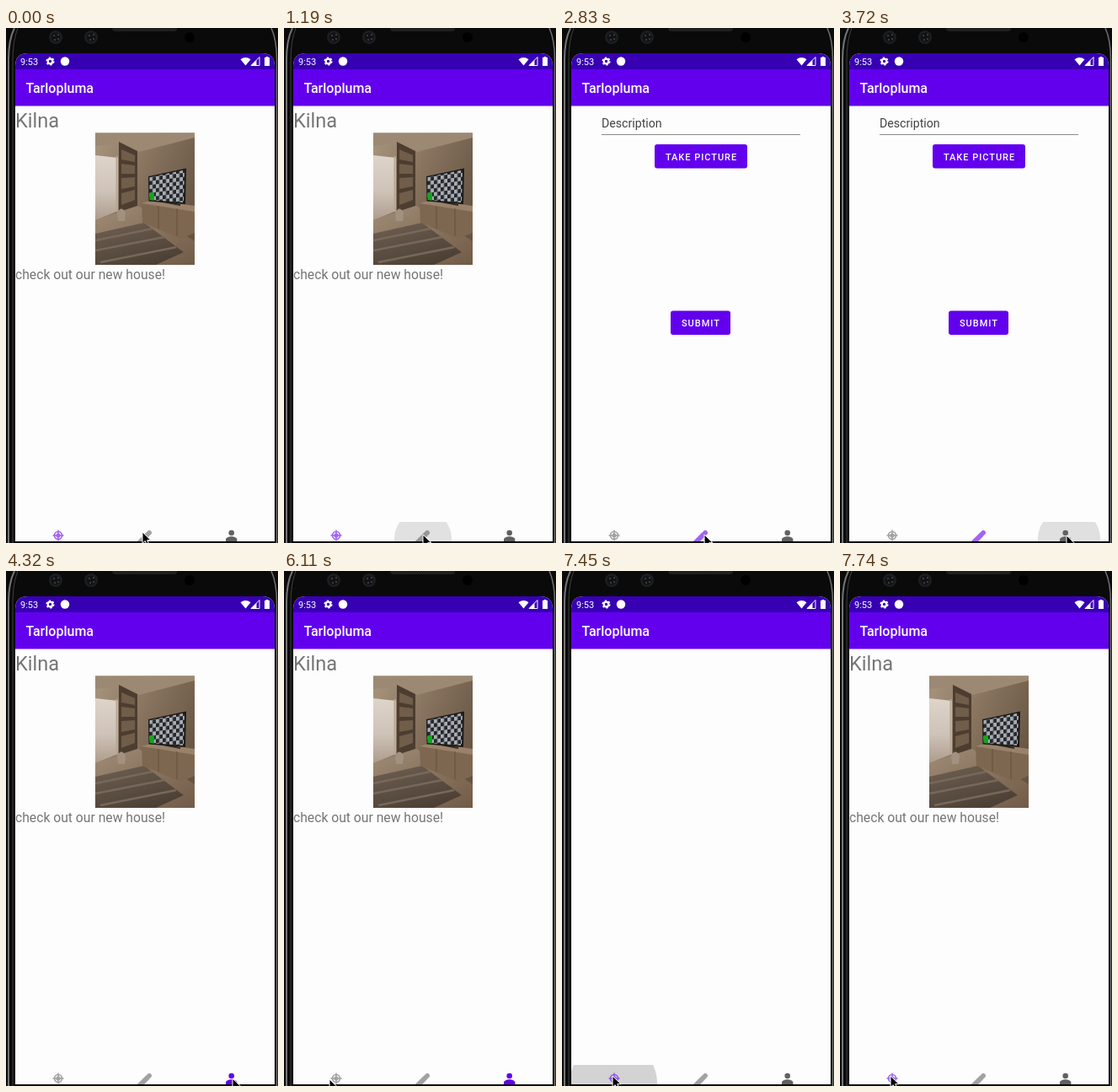
An HTML page that plays this animation: 323 px wide and 611 px high, repeating every 8 s.

```html
<!DOCTYPE html>
<html lang="en">
<head>
<meta charset="utf-8">
<title>Photo feed</title>
<style>
html, body { margin: 0; width: 100%; height: 100%; overflow: hidden; background: #0a0a0a; }
svg { display: block; width: 100%; height: 100%; font-family: Roboto, sans-serif; }

.medium { font-weight: 500; }
.button { font-size: 11px; font-weight: 500; letter-spacing: .98px; fill: #fff; }
.icon { color: #666; fill: currentColor; stroke: currentColor; }
.soft { opacity: .6; }

.post, .form, .icon, .ripple, .cursor { animation: 8s step-end infinite; }
.post { animation-name: post; }
.form { animation-name: form; }
.home { animation-name: home; }
.edit { animation-name: edit; }
.user { animation-name: user; stroke: none; }
.ripple { animation-name: ripple; }
.cursor { animation-name: cursor; }

@keyframes post {
  0%, 50.25%, 95% { visibility: visible; }
  16.75%, 93.125% { visibility: hidden; }
  100% { visibility: visible; }
}
@keyframes form {
  0%, 48.375%, 100% { visibility: hidden; }
  16.75% { visibility: visible; }
}
@keyframes home {
  0%, 93.125%, 100% { color: #6200ee; }
  16.75% { color: #666; }
}
@keyframes edit {
  0%, 48.375%, 100% { color: #666; }
  16.75% { color: #6200ee; }
}
@keyframes user {
  0%, 93.125%, 100% { color: #616161; }
  48.375% { color: #6200ee; }
}
@keyframes ripple {
  0%, 20.375%, 54%, 96.75%, 100% { transform: translate(165px, 608px) scale(30); opacity: 0; }
  14.875% { transform: translate(165px, 606px) scale(34); opacity: .11; }
  16.75% { transform: translate(165px, 608px) scale(56); opacity: .165; }
  18.625% { transform: translate(165px, 608px) scale(58); opacity: .07; }
  46.5% { transform: translate(272px, 606px) scale(37); opacity: .115; }
  48.375% { transform: translate(268px, 608px) scale(54); opacity: .165; }
  50.25% { transform: translate(268px, 608px) scale(57); opacity: .12; }
  52.125% { transform: translate(268px, 608px) scale(58); opacity: .05; }
  93.125% { transform: translate(61px, 608px) scale(52); opacity: .165; }
  95% { transform: translate(62px, 608px) scale(57); opacity: .07; }
}
@keyframes cursor {
  0%, 100% { transform: translate(162px, 598px); }
  7.5% { transform: translate(163px, 599px); }
  9.25% { transform: translate(164px, 600px); }
  11.125% { transform: translate(165px, 601px); }
  35.375% { transform: translate(169px, 601px); }
  37.25% { transform: translate(187px, 602px); }
  39.125% { transform: translate(220px, 603px); }
  41% { transform: translate(249px, 603px); }
  42.75% { transform: translate(264px, 602px); }
  44.625% { transform: translate(269px, 602px); }
  69% { transform: translate(232px, 599px); }
  70.875% { transform: translate(104px, 596px); }
  72.75% { transform: translate(41px, 598px); }
  76.375% { transform: translate(54px, 603px); }
  78.25% { transform: translate(60px, 601px); }
  80.125% { transform: translate(65px, 599px); }
  82% { transform: translate(66px, 598px); }
  87.5% { transform: translate(62px, 598px); }
  89.375% { transform: translate(60px, 599px); }
}
</style>
</head>
<body>
<svg viewBox="0 0 323 611" preserveAspectRatio="none">
  <defs>
    <clipPath id="screen"><path d="M11 609V45Q11 30 26 30H304Q319 30 319 45V609Z"/></clipPath>
    <clipPath id="nav"><path d="M11 586.500H319V609H11Z"/></clipPath>
    <clipPath id="photo"><path d="M106 124.500H224V281H106Z"/></clipPath>
    <pattern id="checks" width="8" height="9.400" patternUnits="userSpaceOnUse" patternTransform="translate(170 177) skewY(-7)">
      <path d="M0 0H8V9.400H0Z" fill="#25272b"/>
      <path d="M0 0H4V4.700H0ZM4 4.700H8V9.400H4Z" fill="#a9adb4"/>
    </pattern>
    <pattern id="mesh" width="3" height="3" patternUnits="userSpaceOnUse">
      <path d="M0 0H3V3H0Z" fill="#191919"/>
      <path d="M0 3L3 0" stroke="#333" stroke-width=".7"/>
    </pattern>
    <linearGradient id="wall" x2="1" y2=".6">
      <stop stop-color="#a9967f"/><stop offset=".5" stop-color="#86725d"/><stop offset="1" stop-color="#665443"/>
    </linearGradient>
    <linearGradient id="window" x2="0" y2="1">
      <stop stop-color="#ded4c9"/><stop offset=".55" stop-color="#cfc3b8"/><stop offset="1" stop-color="#ad9c8d"/>
    </linearGradient>
    <linearGradient id="floor" x2="1" y2="1">
      <stop stop-color="#a08c77"/><stop offset="1" stop-color="#715b47"/>
    </linearGradient>
    <linearGradient id="rug" x2=".6" y2="1">
      <stop stop-color="#6f6052"/><stop offset="1" stop-color="#4c4035"/>
    </linearGradient>
    <g id="lens">
      <circle r="8" fill="#1d1e20"/>
      <circle r="5.500" fill="#111214"/>
      <path d="M-3-2h2M2-3h2M-2 3h2M2 2h2" stroke="#45484c" stroke-width="1.500"/>
    </g>
  </defs>

  <!-- Phone body -->
  <path d="M0 0H323V611H0Z" fill="#0a0a0a"/>
  <g fill="none">
    <path d="M10 0Q3 14 3 38V611" stroke="#757575" stroke-width="2"/>
    <path d="M14 0Q8 15 8 38V611" stroke="#404040"/>
    <path d="M315 0Q321.500 14 321.500 38V611" stroke="#707070" stroke-width="1.500"/>
  </g>
  <path d="M126 0H203Q203 4 199 4H130Q126 4 126 0Z" fill="url(#mesh)"/>
  <use href="#lens" x="59" y="11"/>
  <use href="#lens" x="101" y="11"/>
  <circle cx="218" cy="11" r="6" fill="#000"/>

  <g clip-path="url(#screen)">
    <path d="M11 30H319V609H11Z" fill="#fdfdfd"/>
    <path d="M11 30H319V49H11Z" fill="#3700b3"/>
    <path d="M11 49H319V92.500H11Z" fill="#6200ee"/>

    <!-- Status bar -->
    <g fill="#fff">
      <text x="17" y="44" font-size="11">9:53</text>
      <g fill="none" stroke="#fff">
        <circle cx="52.500" cy="39.500" r="2.800" stroke-width="2.200"/>
        <circle cx="52.500" cy="39.500" r="4.300" stroke-width="1.600" stroke-dasharray="2.250 2.253"/>
      </g>
      <circle cx="70" cy="39.500" r="5.200"/>
      <path d="M278.500 37.200Q284.500 32.800 290.500 37.200L284.500 44.500Z"/>
      <path d="M301 34.500V44.500H291Z" fill="none" stroke="#fff" stroke-width="1"/>
      <path d="M297.500 38V44.500H291Z"/>
      <path d="M308.500 35V34H311.500V35H313V45H307V35Z"/>
    </g>
    <text class="medium" x="23.500" y="77" font-size="16" fill="#fff">Tarlopluma</text>

    <!-- Feed post -->
    <g class="post">
      <text x="11" y="118" font-size="23.600" fill="#757575">Kilna</text>
      <g clip-path="url(#photo)">
        <path d="M106 124H224V281H106Z" fill="url(#wall)"/>
        <path d="M106 124H224V130L158 147L134 137L106 140Z" fill="#9c8973"/>
        <path d="M106 151L133 154V217L106 228Z" fill="url(#window)"/>
        <path d="M131.500 152V218" stroke="#b5a695" stroke-width="2"/>
        <path d="M134 135L156 146V211L134 218Z" fill="#4c3d30"/>
        <path d="M137 144L153 151V159L137 156ZM137 161L153 163V173L137 173ZM137 178L153 177V188L137 191ZM137 196L153 192V204L137 210Z" fill="#705d4a"/>
        <path d="M106 228L157 211L224 253V281H106Z" fill="url(#floor)"/>
        <path d="M106 244L164 231L211 266L178 281H106Z" fill="url(#rug)"/>
        <path d="M106 252L174 238M106 264L188 248M112 278L202 260" stroke="#77685a" stroke-width="2.500"/>
        <path d="M161 208L224 217V243L207 250L162 231Z" fill="#7e6751"/>
        <path d="M161 208L174 204L224 211V218Z" fill="#9a826a"/>
        <path d="M181 211V238M203 214V247" stroke="#65513f"/>
        <path d="M132 219Q137 210 142 219L141 229H133Z" fill="#a39180"/>
        <path d="M181 205L207 210" stroke="#30291f" stroke-width="2"/>
        <path d="M169 176L214 166.500L213 209L169.500 205.500Z" fill="#1c1a19"/>
        <path d="M170.500 177L212 168.500L211 207L170.500 204Z" fill="url(#checks)"/>
        <path d="M170.500 195.500L176 195V204.400L170.500 204Z" fill="#14a51c"/>
      </g>
      <text x="11" y="298" font-size="15.700" fill="#757575">check out our new house!</text>
    </g>

    <!-- New post form -->
    <g class="form">
      <text x="47" y="118" font-size="14.150" fill="#424242">Description</text>
      <path d="M47 126.500H283" stroke="#898989"/>
      <rect x="110" y="138" width="110" height="28.500" rx="3" fill="#6200ee"/>
      <text class="button" x="123" y="157">TAKE PICTURE</text>
      <rect x="129" y="335.500" width="71" height="28.500" rx="3" fill="#6200ee"/>
      <text class="button" x="142" y="354">SUBMIT</text>
    </g>

    <!-- Bottom navigation -->
    <g clip-path="url(#nav)"><circle class="ripple" r="1"/></g>
    <g class="soft">
      <g class="icon home">
        <circle cx="62" cy="602" r="4.500" fill="none" stroke-width="1.700"/>
        <circle cx="62" cy="602" r="2.600" stroke="none"/>
        <path d="M55.500 602H68.500M62 595.500V608.500" stroke-width="1.500"/>
      </g>
    </g>
    <g class="soft">
      <g class="icon edit" stroke-width="6">
        <path d="M157 612L168 601"/>
        <path d="M168.700 600.300L170.200 598.800" stroke-linecap="round" stroke-width="5.500"/>
      </g>
    </g>
    <g class="icon user">
      <circle cx="267.700" cy="599" r="3.300"/>
      <path d="M261 609V607C261 604.400 265 603.300 267.700 603.300S274.400 604.400 274.400 607V609Z"/>
    </g>
  </g>

  <path class="cursor" d="M0 0V13.500L3.200 10.600L5.500 15.700L7.900 14.600L5.700 9.700H10Z" fill="#000" stroke="#fff" stroke-width="1"/>
</svg>
</body>
</html>
```
